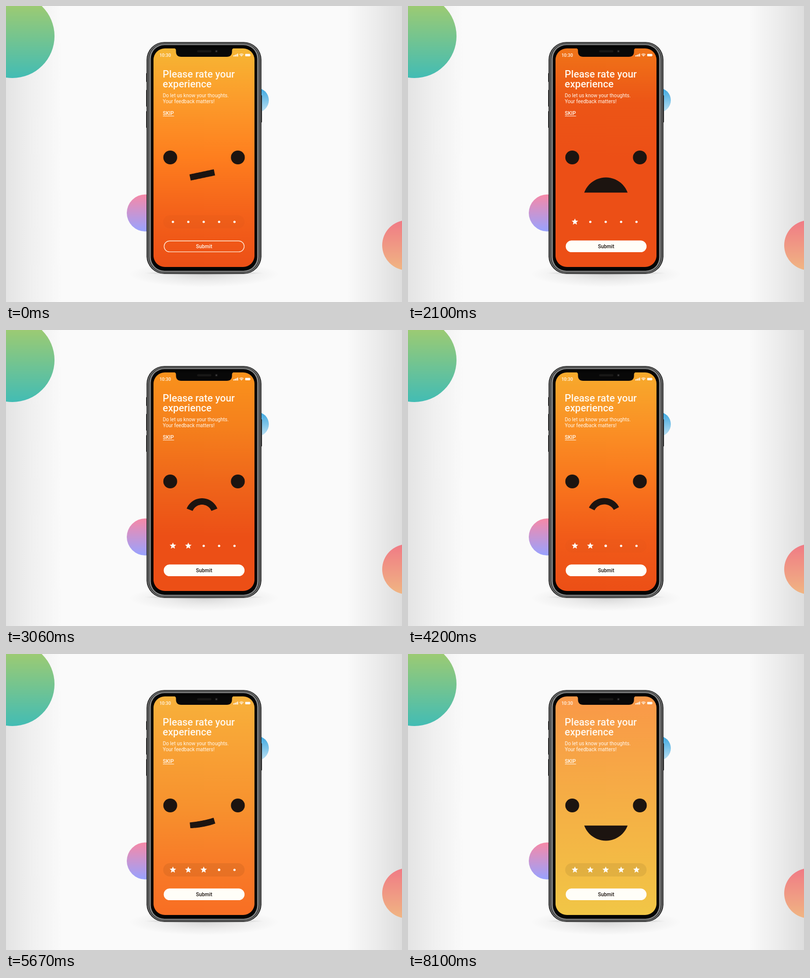
These frames come from a looping animation (800x600 px, 8130 ms). An HTML page:

```html
<!DOCTYPE html>
<html lang="en">
<head>
<meta charset="utf-8">
<title>Rate your experience</title>
<style>
  html, body { margin: 0; width: 100%; height: 100%; overflow: hidden; background: #fafafa; }
  svg { display: block; width: 800px; height: 600px; }
  text { font-family: Roboto, "Liberation Sans", sans-serif; fill: #fff8ee; }
  .medium { font-weight: 500; }
  .title { font-size: 20.15px; }
  .note { font-size: 10.15px; }
</style>
</head>
<body>
<svg viewBox="0 0 800 600">
  <defs>
    <linearGradient id="sides">
      <stop offset="0" stop-color="#e4e4e4"/>
      <stop offset=".06" stop-color="#efefef"/>
      <stop offset=".14" stop-color="#fafafa"/>
      <stop offset=".86" stop-color="#fafafa"/>
      <stop offset=".94" stop-color="#ebebeb"/>
      <stop offset="1" stop-color="#dddddd"/>
    </linearGradient>
    <linearGradient id="green" x2="0" y2="1">
      <stop offset=".1" stop-color="#a0cb70"/><stop offset="1" stop-color="#42bcb4"/>
    </linearGradient>
    <linearGradient id="blue" x2="0" y2="1">
      <stop offset="0" stop-color="#3aa6df"/><stop offset="1" stop-color="#c0e2f3"/>
    </linearGradient>
    <linearGradient id="pink" x2="0" y2="1">
      <stop offset="0" stop-color="#f688a6"/><stop offset="1" stop-color="#98a2ff"/>
    </linearGradient>
    <linearGradient id="coral" x2="0" y2="1">
      <stop offset="0" stop-color="#f07a85"/><stop offset="1" stop-color="#f0b683"/>
    </linearGradient>
    <linearGradient id="glow" x2="0" y2="1"></linearGradient>
    <radialGradient id="shade">
      <stop offset="0" stop-color="#000" stop-opacity=".42"/>
      <stop offset=".55" stop-color="#000" stop-opacity=".16"/>
      <stop offset="1" stop-color="#000" stop-opacity="0"/>
    </radialGradient>
  </defs>

  <rect width="800" height="600" fill="url(#sides)"/>
  <circle cx="13" cy="61" r="85" fill="url(#green)"/>
  <circle cx="506" cy="191" r="25" fill="url(#blue)"/>
  <circle cx="281.5" cy="419.5" r="37.5" fill="url(#pink)"/>
  <circle cx="811" cy="485" r="51" fill="url(#coral)"/>

  <!-- phone body -->
  <ellipse cx="400" cy="544" rx="152" ry="26" fill="url(#shade)" opacity=".32"/>
  <ellipse cx="400" cy="541.5" rx="122" ry="4" fill="url(#shade)"/>
  <g fill="#3a3a3a">
    <rect x="283" y="136" width="3" height="18" rx="1"/>
    <rect x="283" y="170" width="3" height="34" rx="1"/>
    <rect x="283" y="213" width="3" height="34" rx="1"/>
    <rect x="514" y="181" width="3.2" height="55" rx="1"/>
  </g>
  <g id="frame"></g>
  <rect x="298" y="86" width="204" height="443" rx="23" fill="url(#glow)"/>
  <path d="M339 85.5Q343.4 86 343.4 90V92Q343.4 103 354 103H446Q456.6 103 456.6 92V90Q456.6 86 461 85.5Z" fill="#080808"/>
  <rect x="386" y="89.5" width="29" height="4.5" rx="2.2" fill="#181716"/>
  <circle cx="425" cy="91.7" r="2.8" fill="#1c1b1b"/>
  <circle cx="425" cy="91.7" r=".9" fill="#66666a"/>

  <!-- status bar -->
  <text class="medium" x="309.9" y="102.7" font-size="9.2">10:30</text>
  <g fill="#fff8ee">
    <rect x="459.3" y="100" width="1.8" height="2.4"/>
    <rect x="461.9" y="99" width="1.8" height="3.4"/>
    <rect x="464.5" y="97.8" width="1.8" height="4.6"/>
    <rect x="467.1" y="96.5" width="1.8" height="5.9"/>
    <rect x="483.2" y="97" width="10" height="5" rx="1.2"/>
    <rect x="493.6" y="98.6" width=".9" height="1.8"/>
    <path d="M475.7 102.6l-1.5-1.8q1.5-1.2 3 0z"/>
  </g>
  <g fill="none" stroke="#fff8ee" stroke-width="1.2">
    <path d="M471.5 98.4q4.2-3.2 8.4 0"/>
    <path d="M473 100.2q2.7-2 5.4 0"/>
  </g>

  <text class="medium title" x="316.6" y="145">Please rate your</text>
  <text class="medium title" x="316.6" y="165">experience</text>
  <text class="note" x="316.7" y="185">Do let us know your thoughts.</text>
  <text class="note" x="316.7" y="197">Your feedback matters!</text>
  <text class="medium" x="316.8" y="221" font-size="10.4">SKIP</text>
  <rect x="317" y="222.6" width="22.5" height="1" fill="#fff8ee"/>

  <g fill="#1c1410">
    <circle cx="331.8" cy="307" r="14"/>
    <circle cx="468.4" cy="307" r="14"/>
    <path id="mouth"/>
  </g>

  <rect id="pill" x="317.5" y="424" width="164.5" height="27" rx="13.5"/>
  <g id="stars" fill="#fffdf8"></g>

  <rect x="319.4" y="476.2" width="161.8" height="22.2" rx="11.1" fill="none" stroke="#ffe6d2" stroke-width="1.4"/>
  <rect id="fill" x="318.8" y="475.6" width="162.8" height="23.4" rx="11.7" fill="#fffef8"/>
  <text id="submit" class="medium" x="400.2" y="491" font-size="10.3" text-anchor="middle">Submit</text>
</svg>
<script>
const LOOP = 8130, FIRST = 630, PERIOD = 1470, MOVE = 960, POSE_DELAY = 550;
const SEGMENTS = 24;
const $ = id => document.getElementById(id);
const SVG = "http://www.w3.org/2000/svg";
const clamp = v => Math.min(1, Math.max(0, v));
const mix = (a, b, k) => a + (b - a) * k;
const ease = k => (1 - Math.cos(Math.PI * k)) / 2;

function add(parent, tag, attrs = {}) {
  const el = document.createElementNS(SVG, tag);
  for (const key in attrs) el.setAttribute(key, attrs[key]);
  return parent.appendChild(el);
}

// Screen colours from top to bottom for each rating.
const skies = {
  1: ["f07418", "ec5516", "ec4f16", "ec4f16", "ec4f16"],
  2: ["f9921c", "f5801c", "ef661a", "ec4f16", "ec4f16"],
  3: ["f6b634", "fc9a2a", "fe7e1e", "f4621a", "ec4f16"],
  4: ["f8ae3e", "f6a53a", "f49c36", "fa8a30", "fe7e2a"],
  5: ["f99848", "f7a346", "f5af45", "f3ba45", "f1c646"]
};
const pillShade = { 1: 0, 2: 0, 3: 0.02, 4: 0.09, 5: 0.07 };
const rgb = hex => [0, 2, 4].map(i => parseInt(hex.slice(i, i + 2), 16));
const mixColor = (a, b, k) => {
  const from = rgb(a), to = rgb(b);
  return `rgb(${from.map((v, i) => Math.round(mix(v, to[i], k)))})`;
};

// Mouth edges run left to right with u from 0 to 1.
const arc = (cx, cy, r, spread, side) => u => {
  const a = mix(-spread, spread, u);
  return [cx + r * Math.sin(a), cy + side * r * Math.cos(a)];
};
const line = (x0, y0, x1, y1) => u => [mix(x0, x1, u), mix(y0, y1, u)];
const OPEN = 1.219, BEND = 1.19;
const mouths = {
  1: [arc(399.8, 394.1, 46.6, OPEN, -1), line(356, 378.3, 443.6, 378.3)],
  2: [arc(396, 374.4, 33.4, BEND, -1), arc(396, 374.4, 20.4, BEND, -1)],
  3: [line(370.6, 341.4, 419.8, 331), line(373.2, 353.8, 422.4, 343.4)],
  4: [arc(396, 334.1, 20.4, BEND, 1), arc(396, 334.1, 33.4, BEND, 1)],
  5: [line(356, 347.7, 443.6, 347.7), arc(399.8, 331.9, 46.6, OPEN, 1)]
};

function mouthPath(from, to, k) {
  const edge = side => Array.from({ length: SEGMENTS + 1 }, (_, i) => {
    const a = mouths[from][side](i / SEGMENTS), b = mouths[to][side](i / SEGMENTS);
    return a.map((v, n) => mix(v, b[n], k).toFixed(2)).join(" ");
  });
  return "M" + [...edge(0), ...edge(1).reverse()].join("L") + "Z";
}

// A dot whose ten corners spread into a star.
function starPoints(cx, cy, k) {
  return Array.from({ length: 10 }, (_, i) => {
    const r = mix(2.4, i % 2 ? 3.1 : 6.9, k), a = Math.PI * (i / 5 - 0.5);
    return `${(cx + r * Math.cos(a)).toFixed(2)},${(cy + r * Math.sin(a)).toFixed(2)}`;
  }).join(" ");
}

// Nested rims: side inset, top and bottom inset, colour.
[[0, 0, "#161616"], [1.6, 1.2, "#737474"], [3.8, 2.8, "#2e2e2e"],
 [5.4, 4, "#868787"], [8.6, 6.3, "#050505"]].forEach(([dx, dy, fill]) =>
  add($("frame"), "rect", {
    x: 284 + dx, y: 73 + dy, width: 232 - 2 * dx, height: 470 - 2 * dy, rx: 36 - dx, fill
  }));

const stops = skies[3].map((_, i) => add($("glow"), "stop", { offset: i / 4 }));
const stars = [1, 2, 3, 4, 5].map(() => add($("stars"), "polygon"));

function draw(t) {
  const turn = Math.min(4, Math.max(0, Math.floor((t - FIRST) / PERIOD)));
  const phase = t - FIRST - turn * PERIOD;
  const from = turn || 3, to = turn + 1;
  const slide = clamp(phase / MOVE);
  const pose = ease(clamp((phase - POSE_DELAY) / (MOVE - POSE_DELAY)));

  stops.forEach((s, i) =>
    s.setAttribute("stop-color", mixColor(skies[from][i], skies[to][i], slide)));
  $("pill").setAttribute("fill-opacity", mix(pillShade[from], pillShade[to], slide));
  $("mouth").setAttribute("d", mouthPath(from, to, pose));
  stars.forEach((s, i) => {
    const k = i < turn ? 1 : i === turn ? pose : 0;
    s.setAttribute("points", starPoints(337.2 + 31.1 * i, 437.6, k));
  });

  const ready = turn ? 1 : pose;
  $("fill").setAttribute("opacity", ready);
  $("submit").style.fill = mixColor("fff8ee", "1c1410", ready);
}

const start = performance.now();
function tick() {
  draw((performance.now() - start) % LOOP);
  requestAnimationFrame(tick);
}
tick();
</script>
</body>
</html>
```
